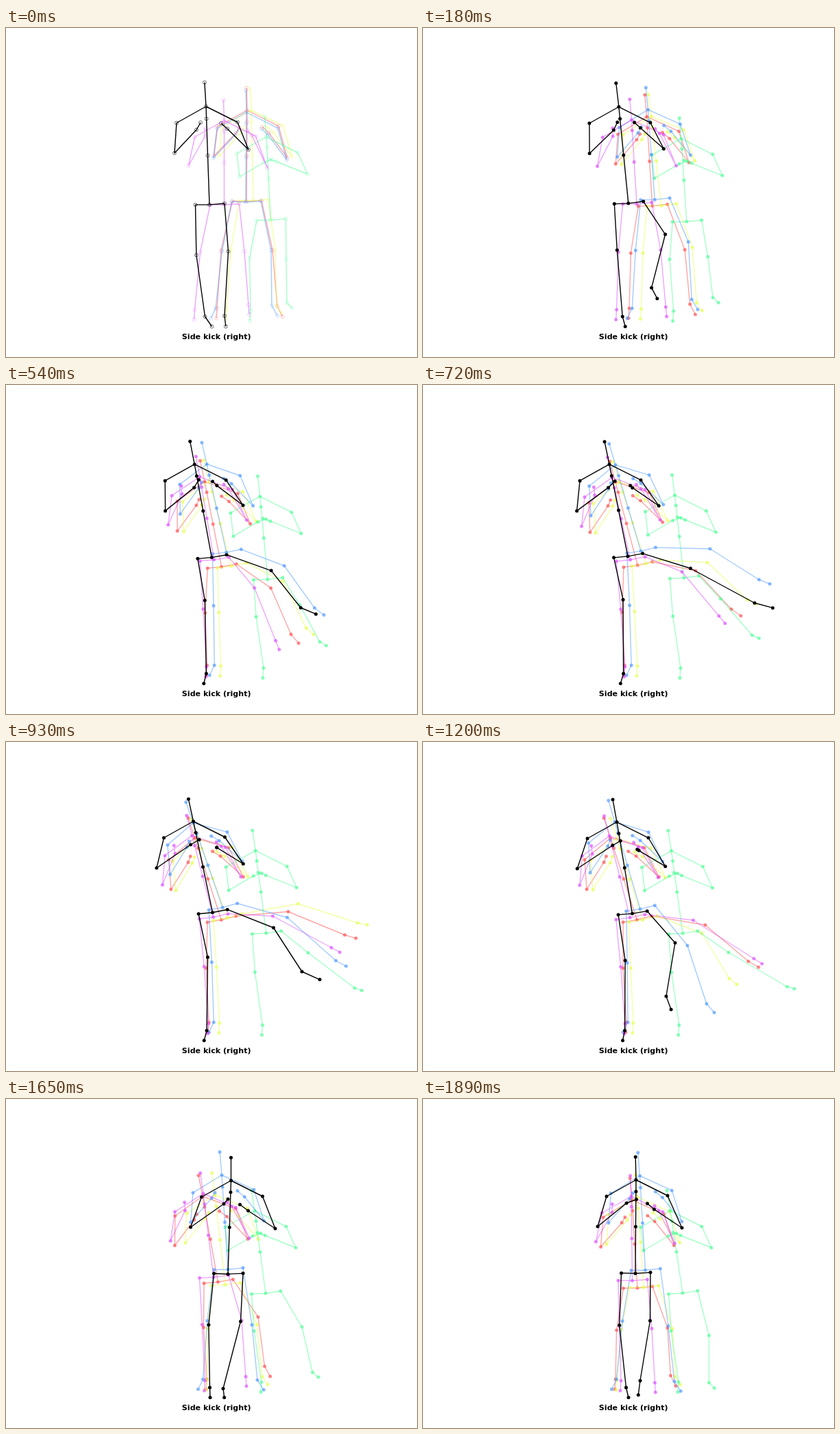
Animation, 600 px wide and 480 px high, one loop 1.92 s. Source, as an HTML page with a canvas:

```html
<!DOCTYPE html>
<html lang="en">
<head>
<meta charset="utf-8">
<title>Side kick (right)</title>
<style>
html, body { margin: 0; height: 100%; overflow: hidden; background: #fff; }
canvas { display: block; }
</style>
</head>
<body>
<canvas id="stage" width="600" height="480"></canvas>
<script>
const ctx = document.getElementById('stage').getContext('2d');
const LOOP = 1920, STEP = 30;
// Key times of the fast tracks (seven keys) and the slow ones (five keys).
const FAST = [0, 390, 720, 930, 1200, 1650, 1890];
const SLOW = [0, 390, 1050, 1650, 1890];

// Arm joints relative to the neck: elbow, wrist, hand.
const guard = { left: [-48, 67, -16, 33, -11, 25], right: [59, 69, 32, 33, 22, 24] };

// spine: neck x, neck y, hip x, length.  stand: ankle x, ankle y, foot dx, knee bias, knee height.
// kick: knee x, y, ankle x, y.  foot: turn relative to the shin, length.  sway: arm turn per lean.
const bodies = [
  {
    hue: 0, sway: .6, arms: guard,
    spine: [[352, 302, 274, 287, 305], [120, 138, 140, 142, 147], [351, 320, 314, 309.5, 313], [133, 128, 125.5, 127, 129]],
    stand: [[308, 295, 296.5, 293, 281], 409, -1, -3, .46],
    kick: [[389, 380.5, 398, 412, 412, 368, 357], [324, 314, 271, 247.5, 267, 318, 334],
      [396, 396, 450, 494.5, 475, 377.5, 361.5], [406, 388, 327, 281.5, 320, 390, 403.5]],
    foot: [.74, 17]
  },
  {
    hue: 68, sway: .6, arms: guard,
    spine: [[358, 309, 280, 305, 313], [120, 137, 141, 140, 143], [361, 335, 322, 320, 322], [132, 130, 123, 132, 132]],
    stand: [[322, 315, 310, 293, 283], 410, -1, -1, .455],
    kick: [[393, 397, 415, 426.5, 407, 366, 364], [324, 307, 259, 236, 279, 329, 335],
      [395, 415, 473, 513.5, 447, 374, 368], [405, 383, 313, 264, 345, 405, 405]],
    foot: [.65, 14]
  },
  {
    hue: 144, sway: 0,
    arms: { left: [-39, 58, -3, 37, 9, 33], right: [60, 54, 15, 36, 4, 32] },
    spine: [[380, 373.5, 363, 363, 361], [159, 163, 158, 163, 163], [386.5, 383, 379.5, 379, 379], 121.5],
    stand: [[357, 373.5, 374, 373, 373], 413, -1, -5, .42],
    kick: [[409, 423.5, 434.5, 441, 446, 432, 417.5], [337, 328, 312, 307.5, 307, 332.5, 345],
      [410, 441.5, 480.5, 509, 531.5, 447.5, 417.5], [401, 383.5, 365, 359, 357, 399, 414]],
    foot: [.5, 11]
  },
  {
    hue: 215, sway: .6, arms: guard,
    spine: [[351, 306, 273, 315, 316.5], [123, 116, 118, 111, 112], [350, 327, 316, 324, 324.5], [131, 132, 131, 138, 138]],
    stand: [[306, 304.5, 302, 287.5, 282.5], 409, -7, 0, .465],
    kick: [[387, 393, 419, 410.5, 386, 359, 358], [324, 291.5, 239, 256, 297, 329.5, 331],
      [388, 412, 490.5, 481.5, 414, 367, 367], [405, 371, 284, 319, 382, 410, 412]],
    foot: [.68, 17]
  },
  {
    hue: 288, sway: .5,
    arms: { left: [-52, 66, -28, 23, -28, 11], right: [63, 69, 40, 21, 34, 14] },
    spine: [[318.5, 290.5, 271, 288, 304], [135, 133.5, 137, 138, 142], [318.5, 306, 302.5, 303, 305.5], 123],
    stand: [[275.5, 289.5, 295.5, 290.5, 289], 411, -1, -1, .455],
    kick: [[348, 351.5, 378, 389.5, 394.5, 344, 334], [326, 313.5, 272.5, 254, 260, 323, 335],
      [354, 368, 432, 475, 483, 350, 338.5], [404, 397, 337, 300, 316, 405, 414]],
    foot: [1, 14]
  },
  {
    sway: 0,
    arms: {
      left: [[-46, -41, -56, -59, -56], 68, [-14, -2, -5, -10.5, -14], 34, [-8, 3.5, 8, -4.5, .5], [23.5, 22, 27.5, 27, 28.5]],
      right: [[62, 69, 72.5, 64.5, 67], [63, 60, 63, 70, 70], [31, 32, 34, 25, 26.5], [32.5, 30, 40, 44, 43],
        [22, 24, 34, 13, 16.5], [24.5, 22.5, 40, 35, 34.5]]
    },
    spine: [[292, 279.5, 272, 273.5, 283, 328.5, 311], [114.5, 115.5, 116, 119, 118],
      [297, 301.5, 299, 301.5, 305.5, 324, 310], [143.5, 139.5, 135.5, 136.5, 136.5]],
    stand: [[290.5, 292, 293.5, 297.5, 296.5], 421, [10, -1.5, -3.5, .5, 3.5], [-7, .7, 6, -4, -7], [.45, .375, .38, .45, .455]],
    kick: [[324.5, 379, 390.5, 390.5, 368, 342.5, 331.5], [326, 279, 267.5, 271, 293, 324.5, 323.5],
      [319, 369, 484, 432, 355, 317, 317], [420, 342, 318, 335, 371, 422.5, 411]],
    foot: [[.89, .39, .53, .42, .7, .79, .98], [15.6, 20.6, 27.5, 28.5, 20.5, 13, 21]]
  }
];

// Smooth curve through the keys, with natural ends.
function sample(keys, t) {
  if (!keys.length) return keys;
  const times = keys.length === FAST.length ? FAST : SLOW;
  const last = times.length - 1;
  let i = 0;
  while (i < last - 1 && t >= times[i + 1]) i++;
  const slope = k => (keys[k + 1] - keys[k]) / (times[k + 1] - times[k]);
  const tangent = k => {
    if (k === 0) return 1.5 * slope(0) - .5 * tangent(1);
    if (k === last) return 1.5 * slope(k - 1) - .5 * tangent(k - 1);
    const before = times[k] - times[k - 1], after = times[k + 1] - times[k];
    return (slope(k - 1) * after + slope(k) * before) / (before + after);
  };
  const span = times[i + 1] - times[i], u = (t - times[i]) / span;
  const a = keys[i], b = keys[i + 1], m = tangent(i) * span, w = tangent(i + 1) * span;
  return a + u * (m + u * (3 * (b - a) - 2 * m - w + u * (2 * (a - b) + m + w)));
}

// Turns flat x, y offsets around a joint.
function turn([ox, oy], offsets, angle) {
  const c = Math.cos(angle), s = Math.sin(angle), out = [];
  for (let i = 0; i < offsets.length; i += 2) {
    const x = offsets[i], y = offsets[i + 1];
    out.push(ox + x * c + y * s, oy - x * s + y * c);
  }
  return out;
}

function line(p) {
  ctx.beginPath();
  for (let i = 0; i < p.length; i += 2) ctx.lineTo(p[i], p[i + 1]);
  ctx.stroke();
}

function dots(p, hollow) {
  for (let i = 0; i < p.length; i += 2) {
    ctx.beginPath();
    ctx.arc(p[i], p[i + 1], 2.5, 0, 7);
    hollow ? ctx.stroke() : ctx.fill();
  }
}

function pose(b, t) {
  const at = list => list.map(k => sample(k, t));
  const [nx, ny, hx, length] = at(b.spine);
  const dx = hx - nx, dy = Math.sqrt(length ** 2 - dx ** 2), lean = Math.atan2(dx, dy);
  const neck = [nx, ny], hip = [hx, ny + dy];
  const along = f => [nx + dx * f, ny + dy * f];
  const arm = (shoulder, rest) => [...neck, ...turn(neck, [...shoulder, ...at(rest)], lean * b.sway)];

  const [lx, ly, rx, ry] = turn(hip, [-20.5, -.5, 22, -1.5], lean * .6);
  const [ax, ay, toe, bias, height] = at(b.stand);
  const knee = [lx + (ax - lx) * .6 + bias, ly + (ay - ly) * height];
  const [kx, ky, sx, sy] = at(b.kick), [bend, size] = at(b.foot);
  const aim = Math.atan2(sy - ky, sx - kx) * bend;

  return {
    spine: [nx - dx * .22 - 1, ny - dy * .245, ...neck, ...along(.125), ...along(.5), ...hip],
    limbs: [
      arm([-43, 24], b.arms.left),
      arm([46, 23], b.arms.right),
      [...hip, lx, ly, ...knee, ax, ay, ax + toe, ay + 14.5],
      [...hip, rx, ry, kx, ky, sx, sy, sx + Math.cos(aim) * size, sy + Math.sin(aim) * size]
    ]
  };
}

function drawBody(b, t) {
  const black = b.hue === undefined, alpha = black ? 1 : .5, hollow = t < STEP;
  const { spine, limbs } = pose(b, t);
  ctx.strokeStyle = ctx.fillStyle = black ? '#000' : `hsl(${b.hue}, 100%, 65%)`;
  ctx.globalAlpha = alpha;
  ctx.lineWidth = 1.4;
  [spine, ...limbs].forEach(line);

  ctx.globalAlpha = hollow ? alpha * .8 : Math.min(1, alpha * 1.3);
  ctx.lineWidth = .7;
  dots(spine, hollow);
  limbs.forEach(p => dots(p.slice(2), hollow));
}

function draw() {
  const t = Math.floor(performance.now() % LOOP / STEP) * STEP;
  ctx.globalAlpha = 1;
  ctx.fillStyle = '#fff';
  ctx.fillRect(0, 0, 600, 480);
  ctx.lineJoin = 'round';
  for (const b of bodies) drawBody(b, t);
  ctx.globalAlpha = 1;
  ctx.fillStyle = '#000';
  ctx.font = 'bold 11.1px "DejaVu Sans", sans-serif';
  ctx.textAlign = 'center';
  ctx.fillText('Side kick (right)', 307.2, 453.5);
  requestAnimationFrame(draw);
}
draw();
</script>
</body>
</html>
```
